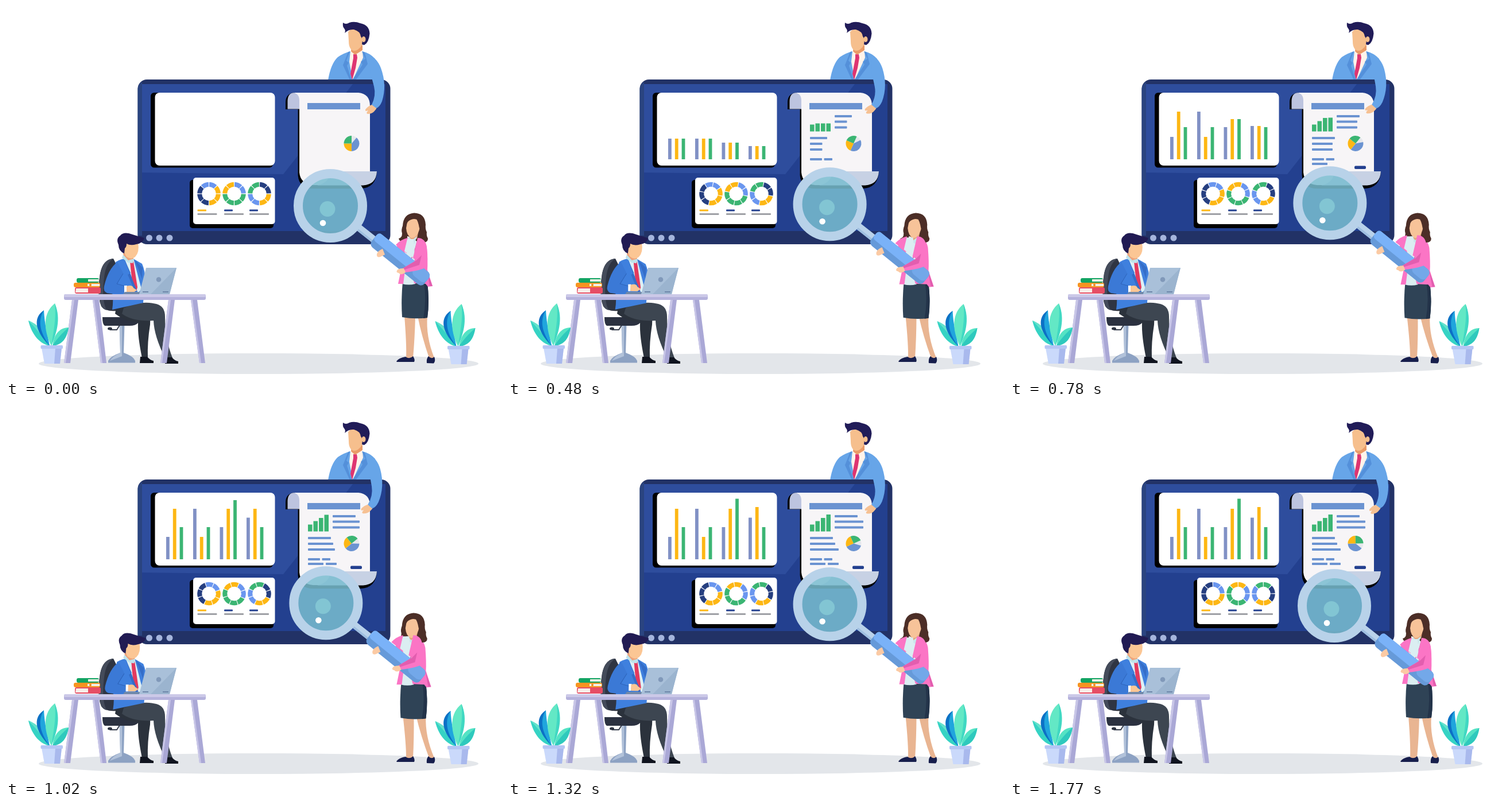
These frames come from a looping animation (864 by 648 pixels, 1.8 s). An HTML page:

```html
<!DOCTYPE html>
<html lang="en">
<head>
<meta charset="utf-8">
<title>Data research</title>
<style>
html, body { margin: 0; width: 100%; height: 100%; overflow: hidden; background: #fff; }
svg { display: block; width: 864px; height: 648px; }
</style>
</head>
<body>
<svg viewBox="0 0 864 648" xmlns="http://www.w3.org/2000/svg">
<defs>
  <g id="plant">
    <path fill="#35d3c4" d="M39 548C52 553 69 566 76 592C60 589 45 574 39 548Z"/>
    <path fill="#64e2cc" d="M39 548C52 553 69 566 76 592C66 579 53 562 39 548Z"/>
    <path fill="#0c71c5" d="M66 530C49 541 47 563 76 592C70 575 61 556 66 530Z"/>
    <path fill="#20a5dd" d="M66 530C56 546 57 566 76 592C73 574 67 555 66 530Z"/>
    <path fill="#63e8c5" d="M85 518C65 534 64 562 79 592C86 572 96 546 85 518Z"/>
    <path fill="#40d8c2" d="M85 518C88 546 82 570 79 592C87 572 97 546 85 518Z"/>
    <path fill="#54e3c4" d="M109 560C92 560 83 574 81 592C98 590 106 579 109 560Z"/>
    <path fill="#2fc9bd" d="M109 560C98 570 88 580 81 592C98 590 106 579 109 560Z"/>
    <path fill="#cad9fb" d="M62 596H97L94 623H67Z"/>
    <path fill="#a9b9ed" d="M86 596H97L94 623H84Z"/>
    <rect x="60.500" y="591" width="38.500" height="6" rx="1.500" fill="#b5c6f4"/>
  </g>
</defs>

<ellipse cx="440" cy="623" rx="383" ry="18" fill="#e3e6ea"/>

<!-- man behind the screen -->
<path fill="#67a5e8" d="M561 129Q566 100 578 89Q588 82 600 79H621Q634 82 643 92L650 129Z"/>
<path fill="#fff3ea" d="M600 79H621L622 90L604 129L598 97Z"/>
<path fill="#de3571" d="M605 84H611L612 90L609 108L603 129L600 118L605 91Z"/>
<path fill="#5490da" d="M599 79L593 95L597 99L594 104L602 129H599L587 103L596 80ZM620 79L626 92L618 97L621 102L603 129H609L630 101L625 81Z"/>
<path fill="#ea9b68" d="M602 68H621V77L608 85L601 79Z"/>
<path fill="#f6bf8d" d="M596 45Q608 33 622 41Q629 58 620 68Q614 78 606 78Q597 76 597 61Z"/>
<path fill="#211c58" d="M587 29Q592 33 598 29Q607 26 617 30Q633 33 633.500 48Q632 64 624 68L620 67Q622 57 618 53Q617 44 606 41Q597 40 590 47Q592 42 589 39Q586 36 587 29Z"/>
<ellipse cx="623" cy="58" rx="3.500" ry="5" fill="#f6bf8d"/>

<!-- screen -->
<rect x="229.500" y="128" width="440" height="287" rx="16" fill="#223266"/>
<path fill="#2a4480" d="M237 132V400H229.500V144Q230 136 237 132Z"/>
<path fill="#23408f" d="M237 136H661V392H237Z"/>
<path fill="#2e4d9d" d="M237 136H604L590 154L509 260L483 293L237 290Z"/>
<g fill="#a5b5dc"><circle cx="249.500" cy="404" r="5.500"/><circle cx="267" cy="404" r="5.500"/><circle cx="285" cy="404" r="5.500"/></g>
<rect x="252" y="151" width="213" height="130.500" rx="6"/>
<rect x="259.500" y="151" width="209" height="127" rx="8" fill="#fff"/>
<g id="chart"></g>
<rect x="320" y="303" width="146" height="84" rx="5"/>
<rect x="326" y="299" width="142.500" height="81" rx="5" fill="#fff"/>
<g id="donuts" fill="none" stroke-width="8"></g>
<g fill="#9fa1a6"><rect x="333.500" y="361" width="34" height="3" rx="1"/><rect x="380" y="361" width="34" height="3" rx="1"/><rect x="424" y="361" width="34" height="3" rx="1"/></g>
<g fill="#23408f"><rect x="333.500" y="354.500" width="15.500" height="3" rx="1" fill="#fdb714"/><rect x="380" y="354.500" width="15" height="3" rx="1"/><rect x="424" y="354.500" width="15" height="3" rx="1"/></g>

<!-- report sheet -->
<path d="M500 151Q487 154 487 168V180H508.500V294Q510 318 535 318H618Q644 317 646 289H630V160Z"/>
<path fill="#f7f5f7" d="M502 151H614Q634 153 634 174V289L620 312H535Q513 310 511 290V166Z"/>
<path fill="#bdc4df" d="M490.500 179.500V165Q491 152 501 151Q511 153 511 165V179.500Z"/>
<path fill="#c7d1e4" d="M565 288H646Q645 311 622 312.500H542Q564 308 565 288Z"/>
<rect x="525" y="169" width="92" height="11" fill="#6b93d1"/>
<g id="report"></g>
<g id="pie"></g>

<!-- reaching arm -->
<g id="reach">
  <path fill="#f6c193" d="M640 171Q633 173 629 177Q624 181 627 183L631 182Q626 187 630 188Q637 188 641 184Q645 180 647 175Z"/>
  <path fill="#67a5e8" d="M632 86Q646 90 653 108Q664 138 655 166Q651 176 645 178L637 172Q645 156 641 140Q638 128 635 119Z"/>
</g>

<!-- woman -->
<g id="legs" fill="#e9b592">
  <path d="M694 540H713Q712 580 709 613H697Q698 590 694 540Z"/>
  <path d="M717 540H734Q731 575 746 613H737Q724 575 717 540Z"/>
</g>
<path fill="#171e4c" d="M680 619Q684 613 696 611Q703 616 709 610Q713 616 711 620H681ZM733 622Q732 614 736 610Q741 616 746 611Q749 618 745 622.500Z"/>
<g id="body">
  <path fill="#2f4356" d="M691 481L734 483Q738 515 734 543Q712 546 690 542Q688 512 691 481Z"/>
  <path fill="#233349" d="M728 482H734Q738 515 734 543L727 544Q733 512 728 482Z"/>
  <path fill="#dbeef2" d="M694 404L718 402L715 435L713 484Q702 487 690 484L694 440Z"/>
  <path fill="#fb75c5" d="M717 403Q730 404 733 420Q735 446 734 460L743 488L735 489L731 484L711 483L706 460L714 435ZM700 404Q689 406 681 417L680 436L690 450L683 484L692 484L697 445L694 425Z"/>
  <path fill="#e25eaf" d="M717 404L720 420L704 444L713 420ZM733 460L743 488L738 488Z"/>
</g>
<g id="head">
  <path fill="#4c2e27" d="M694 411Q686 412 684 405Q690 404 690 396Q688 390 691 383Q692 362 711 360.500Q730 361 731 381Q730 388 733 394Q732 400 735 405Q735 412 727 412Q715 413 710 404L699 401Q700 407 694 411Z"/>
  <path fill="#e5a67c" d="M703 395H718L716 405L707 411L702 404Z"/>
  <path fill="#c9e6ec" d="M702 402L707 408L716 401L711 415L705 411L700 414Z"/>
  <path fill="#f7c399" d="M699 376Q711 367 719 374Q723 384 718 395Q713 405 706 404Q698 400 697 387Z"/>
  <path fill="#4c2e27" d="M696 388Q697 372 713 368Q718 374 720 387L724 384L722 366L708 362L695 370Z"/>
</g>

<!-- magnifier and hands -->
<g id="lens">
  <path stroke="#b9d2ea" stroke-width="12" d="M607 380L645 410"/>
  <path stroke="#9fbfe0" stroke-width="4" d="M609 387L643 414"/>
  <g transform="translate(642 405) rotate(39)">
    <rect x="-1" y="-13.500" width="118" height="28" rx="8" fill="#669ad9"/>
    <rect x="-1" y="-13.500" width="92" height="17" rx="6" fill="#7ab2f8"/>
    <rect x="87" y="-13.500" width="30" height="21" rx="8" fill="#73a8e9"/>
  </g>
  <circle cx="565" cy="348" r="49" fill="#79bed1" fill-opacity=".85"/>
  <circle cx="565" cy="348" r="56" fill="none" stroke="#b8d2e9" stroke-width="16"/>
  <circle cx="560" cy="353.500" r="13.500" fill="#82c5d3"/>
  <circle cx="552" cy="378" r="5.300" fill="#fff"/>
  <path fill="#fbcaa4" d="M656 423Q648 426 646 432Q645 439 652 437L660 433Z"/>
  <path fill="#fb75c5" d="M699 404Q687 407 679 416L698 431L701 418Z"/>
  <path fill="#dbeef2" d="M699 406L710 406L712 432L708 438L694 427Z"/>
  <path fill="#fb75c5" d="M717 404Q731 404 733 421Q736 444 732 455Q722 461 695 464L691 457L715 443L709 439Z"/>
  <path fill="#e25eaf" d="M715 443L724 434L720 451L692 460L691 457Z"/>
  <path fill="#fbcaa4" d="M693 457Q682 457 681 461Q679 464 684 465Q688 470 696 464Z"/>
</g>

<!-- chair and seated man -->
<path fill="#2f3543" d="M187 440Q169 441 164 466Q158 505 166 523Q173 533 193 531L202 470Z"/>
<path fill="#444b5a" d="M187 440Q174 448 171 472Q166 510 175 530Q169 528 166 523Q158 505 164 466Q169 441 187 440Z"/>
<path fill="#8da2c3" d="M197.500 554H206.500L205 604Q222 610 225 618V621.500H178V618Q182 610 199 604Z"/>
<path fill="#b2c2da" d="M198 556H202V610L181 618Q186 610 199 604Z"/>
<path fill="none" stroke="#3a4150" stroke-width="2" d="M198 556L193 564H181"/>
<ellipse cx="181" cy="562" rx="4" ry="2.500" fill="#2f3543"/>
<path fill="#2b3140" d="M168 542H230V552Q226 557 215 557H172Q168 555 168 542Z"/>
<path fill="#2b323c" d="M192 525Q230 517 252 527L251 555Q246 586 247 613H237Q229 575 230 551Q208 550 190 536Z"/>
<path fill="#3d4651" d="M205 526Q235 512 262 519Q277 523 277 541Q277 580 290 613H277Q258 575 257 548Q220 550 202 536Z"/>
<path fill="#10141f" d="M234 611H246Q251 617 257 618V622H233ZM277 612H289Q294 618 300 619V623H277Z"/>
<g id="sitter">
  <path fill="#3f80de" d="M191 446Q205 437 223 441L237 449Q245 467 241 490L239 517Q212 523 185 529Q188 508 184 496Z"/>
  <path fill="#ddf0f5" d="M206 439L222 440L236 493L230 500Z"/>
  <path fill="#e43a5e" d="M216 445L222 445L229 490L227 497L221 489L218 465Z"/>
  <path fill="#346dc8" d="M205 439L227 493V503L212 468L217 465ZM224 442L237 475L238 456Z"/>
  <path fill="#eea37a" d="M204 430H222V442L214 445L205 438Z"/>
  <path fill="#bfe3ea" d="M204 433L213 443L223 440L221 448L213 447L202 439Z"/>
  <path fill="#fbc694" d="M206 411Q220 407 230 412Q233 429 225 437Q218 443 209 436L203 421Z"/>
  <path fill="#211b53" d="M196 416Q191 405 199 400Q203 394 214 396Q226 400 241 404Q239 413 227 415Q217 418 210 414Q210 420 207 422L206 431Q196 427 196 416Z"/>
  <path fill="#3b79d6" d="M194 446Q178 458 171 488Q169 497 176 500Q193 503 207 500L208 488L194 485L204 465Z"/>
  <path fill="none" stroke="#2d63b9" d="M204 466L193 484L208 488"/>
  <g id="hand"><path fill="#fff" d="M206 487H211L210 499H206Z"/><path fill="#fbc694" d="M210 488Q220 485 222 491L228 495L222 499H210Z"/></g>
</g>

<!-- desk -->
<path fill="#7189aa" d="M207 498H237V502H204Z"/>
<path fill="#a9c0d9" d="M244 456H297L285 502H232Z"/>
<path fill="#9bb4cf" d="M297 456L285 502H252Z"/>
<path fill="#6e87aa" d="M238 497h10v2h-10ZM273 497h10v2h-10Z"/>
<circle cx="266" cy="476.500" r="4.300" fill="#8098b9"/>
<g>
  <rect x="123" y="474" width="39" height="8" rx="3" fill="#13a463"/><path fill="#f4f1e6" d="M143 476H162V480H143Z"/>
  <rect x="118" y="482" width="46" height="8" rx="3" fill="#f79420"/><path fill="#f4f1e6" d="M142 484H163V488H142Z"/><circle cx="147" cy="486" r="2" fill="#e98a1b"/>
  <rect x="120" y="490" width="45" height="11" rx="3" fill="#e64e65"/><path fill="#f7eee8" d="M122 492H143V499H121Z"/>
</g>
<path fill="#aaa8d6" d="M115 512H126L112 622H101ZM151 512H162L175 622H165ZM283 512H294L280 622H269ZM322 512H333L347 622H337Z"/>
<path fill="#c8c6e7" d="M115 512H119L104 622H101ZM151 512H154L168 622H165ZM283 512H287L272 622H269ZM322 512H325L340 622H337Z"/>
<rect x="101" y="502" width="247" height="10" rx="3" fill="#b5b2dc"/>
<rect x="101" y="502" width="247" height="5" rx="2.500" fill="#ccc9e8"/>

<use href="#plant"/>
<use href="#plant" x="708.500" y="1"/>
</svg>

<script>
const LOOP = 1800, STEP = 30;
const BLUE = '#6b93d1', GREEN = '#3bb573', YELLOW = '#fdb714', NAVY = '#23408f';
const $ = id => document.getElementById(id);

function add(parent, tag, attrs) {
  const el = document.createElementNS('http://www.w3.org/2000/svg', tag);
  for (const k in attrs) el.setAttribute(k, attrs[k]);
  return parent.appendChild(el);
}
const ramp = (t, a, b) => Math.min(1, Math.max(0, (t - a) / (b - a)));
const wave = u => (1 - Math.cos(u * Math.PI)) / 2;

// Values at shared key times, read by linear interpolation.
const KEYS = [0, 120, 240, 480, 780, 1020, 1140];
function track(values, t) {
  let i = 1;
  while (i < KEYS.length - 1 && t > KEYS[i]) i++;
  return values[i - 1] + (values[i] - values[i - 1]) * ramp(t, KEYS[i - 1], KEYS[i]);
}
const FAST = [0, 1.5, 7, 36, 83, 110, 110];
const MID = [0, 1, 5, 29, 70, 103, 106];
const SLOW = [0, .5, 3, 23, 58, 88, 92];
const MINI = [0, 2, 7, 14, 24, 29, 30];
const LINE = [0, 6, 15, 30, 41, 41, 41];
const LONG = [0, 4, 10.5, 21.5, 36, 47, 50];

const growers = [];
function bar(parent, x, base, w, max, fill, values) {
  const el = add(parent, 'rect', { x, width: w, fill });
  growers.push(t => {
    const h = Math.min(max, track(values, t));
    el.setAttribute('y', base - h);
    el.setAttribute('height', h);
  });
}
function line(x, y, max, width) {
  const el = add($('report'), 'rect', { x, y: y - 2, height: 4, rx: 1, fill: BLUE });
  growers.push(t => el.setAttribute('width', Math.min(max, width(t))));
}

[[279, FAST, 39, 88, 56], [326, FAST, 88, 39, 56], [372.5, MID, 56, 88, 105.5], [419, SLOW, 72.5, 91, 56]]
  .forEach(([x, values, ...tops]) => tops.forEach((h, i) =>
    bar($('chart'), x + i * 11.8, 267, 5.8, h, ['#8191c5', YELLOW, GREEN][i], values)));

[12, 18, 23.5, 29.5].forEach((h, i) => bar($('report'), 526 + i * 9.5, 218.5, 7.5, h, GREEN, MINI));

const byLine = t => track(LINE, t), byLong = t => track(LONG, t);
[[569, 192, 40], [569, 201.5, 50], [569, 211.5, 50], [526, 230, 40], [526, 240, 44], [526, 250, 50]]
  .forEach(([x, y, w], i) => line(x, y, w, i % 3 ? byLong : byLine));
[[526, 267, 21, 30], [550.5, 267, 14.5, 250], [526, 275, 27, 490], [557, 275, 19, 790]]
  .forEach(([x, y, w, from]) => line(x, y, w, t => w * ramp(t, from, from + 200)));

const pill = add($('report'), 'rect', { x: 600, y: 278.5, height: 5.5, rx: 2, fill: NAVY });
growers.push(t => pill.setAttribute('width', 20 * ramp(t, 560, 760)));

const polar = (cx, cy, r, deg) => {
  const a = (deg - 90) * Math.PI / 180;
  return `${cx + r * Math.cos(a)} ${cy + r * Math.sin(a)}`;
};
[[0, 40, '#e6e8ec'], [40, 180, BLUE], [180, 270, YELLOW], [270, 360, GREEN]].forEach(([a, b, fill]) =>
  add($('pie'), 'path', { fill, d: `M602 239.5L${polar(602, 239.5, 13.5, a)}A13.5 13.5 0 0 1 ${polar(602, 239.5, 13.5, b)}Z` }));

const SKY = '#6a96ef', DEEP = '#263f80';
const rings = [
  [353.5, 315, [SKY, 2], [YELLOW, 3], [DEEP, 3]],
  [397.5, 270, [YELLOW, 2], [SKY, 2], [GREEN, 4]],
  [441.5, 270, [GREEN, 2], [DEEP, 2], [YELLOW, 2], [SKY, 2]]
].map(([cx, start, ...parts]) => {
  const g = add($('donuts'), 'g', {});
  let a = start;
  for (const [stroke, n] of parts)
    for (let i = 0; i < n; i++, a += 45)
      add(g, 'path', { stroke, d: `M${polar(cx, 327, 16.3, a + 2)}A16.3 16.3 0 0 1 ${polar(cx, 327, 16.3, a + 43)}` });
  return { g, cx };
});

const put = (id, value) => $(id).setAttribute('transform', value);

function draw(t) {
  growers.forEach(grow => grow(t));
  const u = t / LOOP;
  put('pie', `rotate(${90 * u} 602 239.5)`);
  rings.forEach(({ g, cx }) => g.setAttribute('transform', `rotate(${45 * u} ${cx} 327)`));

  const sway = wave(2 * u);
  put('lens', `translate(${-8 * sway} ${-5 * sway})`);
  put('reach', `rotate(${5.2 * sway} 636 95)`);
  put('body', `translate(${-2.7 * sway} ${1.2 * sway})`);
  put('head', `translate(${-1.3 * sway} 0)`);
  put('legs', `translate(0 613) skewX(${2.1 * sway}) translate(0 -613)`);

  const beat = t % 900;
  const lean = wave(ramp(beat, 0, 250)) - wave(ramp(beat, 250, 760));
  put('sitter', `translate(${3 * lean} 0) rotate(${1.2 * lean} 205 525)`);
  put('hand', `translate(${2 * lean} ${-4 * lean})`);
}

function tick() {
  draw(Math.floor(performance.now() % LOOP / STEP) * STEP);
  requestAnimationFrame(tick);
}
draw(0);
requestAnimationFrame(tick);
</script>
</body>
</html>
```
